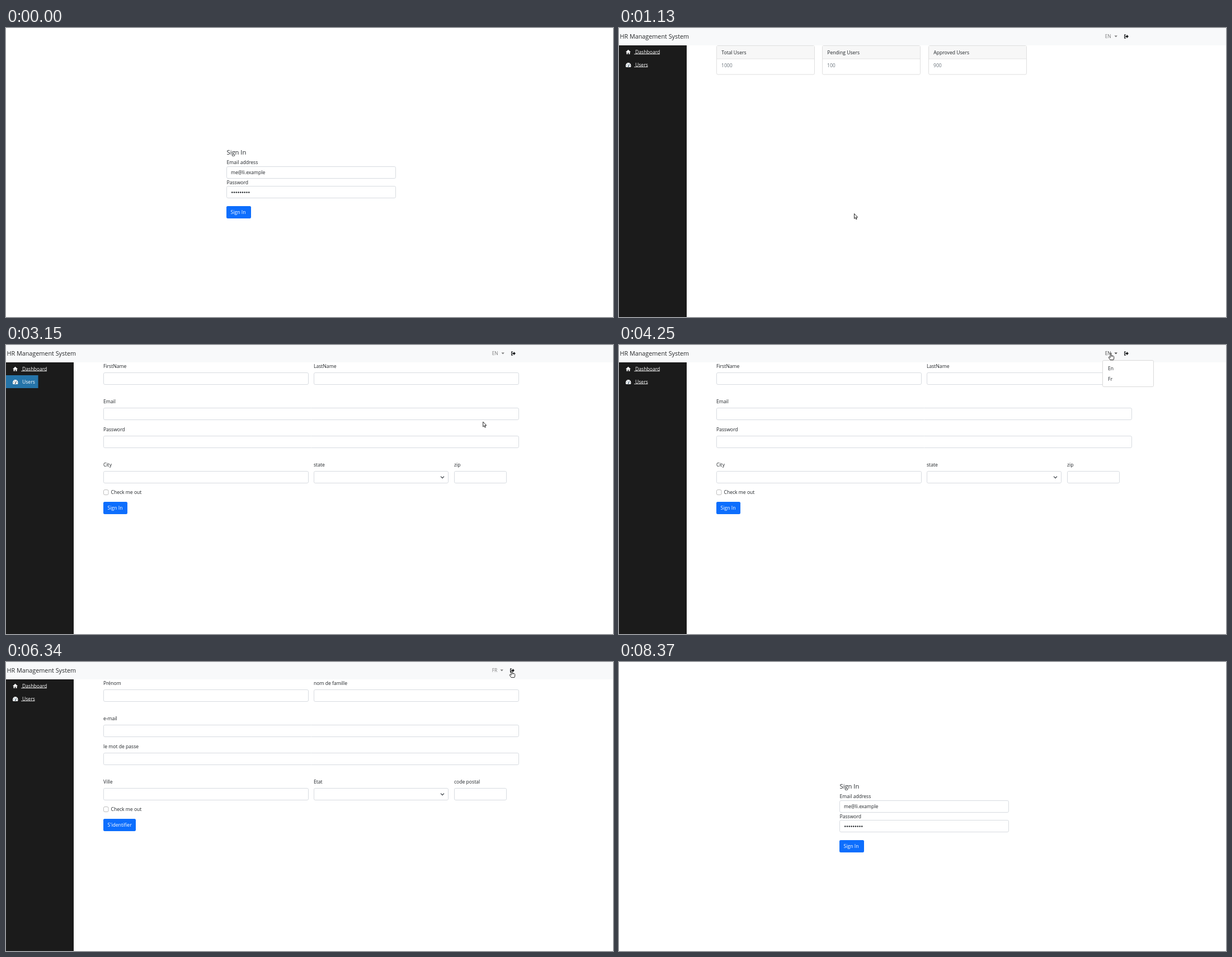
An HTML page with a canvas for the animation above (9.13 s loop, 1085x516 px).

```html
<!DOCTYPE html>
<html lang="en">
<head>
<meta charset="utf-8">
<title>HR admin walkthrough</title>
<style>
  html, body { margin: 0; width: 100%; height: 100%; overflow: hidden; background: #fff; }
  canvas { display: block; }
</style>
</head>
<body>
<canvas id="stage" width="1085" height="516"></canvas>
<script>
const ctx = document.getElementById('stage').getContext('2d');
const LOOP = 9130;
const INK = '#212529', BLUE = '#0d6efd', LINE = '#d7dbe0';

// When the pages and controls change, in ms
const ENTER = 120, DASHBOARD = 1130, HOVER_USERS = 1870, FORM = 2520, LEAVE_USERS = 3230,
      MENU = 4250, FRENCH = 4860, FOCUS_EXIT = 6880, SIGN_OUT = 8370;

// Pointer glides: each eases out towards its stop
const GLIDES = [
  { from: ENTER, to: 280, x: 442, y: 394 },
  { from: 430, to: 890, x: 420, y: 331 },
  { from: 1590, to: 1990, x: 41, y: 61 },
  { from: 2980, to: 3460, x: 953, y: 146 },
  { from: 3460, to: 4080, x: 879, y: 14 },
  { from: 4310, to: 4540, x: 879, y: 59 },
  { from: 6330, to: 6340, x: 904, y: 15 },
  { from: 6730, to: FOCUS_EXIT, x: 906, y: 13 },
  { from: 7970, to: 8130, x: 1085, y: 410 }
];
const CLICKS = [[1040, DASHBOARD], [2370, FORM], [4690, FRENCH], [FOCUS_EXIT, 7350]];

// Twelve-column form grid: every field is [English, French, columns]
const LEFT = 174, COLUMN = 62.7, GUTTER = 9.4;
const ROWS = [
  { top: 49, fields: [['FirstName', 'Prénom', 6], ['LastName', 'nom de famille', 6]] },
  { top: 112, fields: [['Email', 'e-mail', 12]] },
  { top: 162, fields: [['Password', 'le mot de passe', 12]] },
  { top: 225, fields: [['City', 'Ville', 6], ['state', 'Etat', 4], ['zip', 'code postal', 1.65]] }
];

const ARROW = new Path2D('M.5 .5V9.3L2.4 7.5 3.8 10.6 5.2 10 3.8 7H6.6Z');
const HAND = new Path2D('M-1 1C-1-.2 1-.2 1 1V5L4.5 5.6Q5.7 6 5.7 7.5V9Q5.7 11 4.8 12.6H-1L-3.7 8.6Q-3.8 7-2.5 7.2L-1 8.6Z');
const HOUSE = new Path2D('M0 4.3L4.5 0 9 4.3H7.5V8H5.3V5.2H3.7V8H1.5V4.3Z');
const EXIT = new Path2D('M-1.5-1.2H1V-3.3L4.2 0 1 3.3V1.2H-1.5Z');
const CARET = new Path2D('M0 0h5.4l-2.7 2.9Z');

const between = (t, a, b) => t >= a && t < b;
const inside = (p, x, y, w, h) => between(p.x, x, x + w) && between(p.y, y, y + h);
const progress = (t, start, length) => Math.min(1, Math.max(0, (t - start) / length));
const easeOut = (k, power) => 1 - (1 - k) ** power;

function text(str, x, cy, color = INK, size = 8.6, weight = 400) {
  ctx.font = `${weight} ${size}px "Open Sans", "Noto Sans", sans-serif`;
  ctx.fillStyle = color;
  ctx.fillText(str, x, cy + size * 0.36);
}

function rect(x, y, w, h, color) {
  ctx.fillStyle = color;
  ctx.fillRect(x, y, w, h);
}

function box(x, y, w, h, fill, stroke, lineWidth = 1, radius = 2.3) {
  ctx.beginPath();
  ctx.roundRect(x, y, w, h, radius);
  if (fill) { ctx.fillStyle = fill; ctx.fill(); }
  if (stroke) { ctx.strokeStyle = stroke; ctx.lineWidth = lineWidth; ctx.stroke(); }
}

function disc(x, y, r, color) {
  ctx.beginPath();
  ctx.arc(x, y, r, 0, Math.PI * 2);
  ctx.fillStyle = color;
  ctx.fill();
}

function stroke(path, color, width) {
  ctx.strokeStyle = color;
  ctx.lineWidth = width;
  ctx.stroke(new Path2D(path));
}

function at(x, y, paint) {
  ctx.save();
  ctx.translate(x, y);
  paint();
  ctx.restore();
}

function glyph(path, x, y, color) {
  at(x, y, () => {
    ctx.fillStyle = color;
    ctx.fill(path);
  });
}

const field = (x, y, w) => box(x + .5, y + .5, w - 1, 21, '#fff', LINE);

function button(label, x, y, w, color = BLUE) {
  box(x, y, w, 22, color);
  text(label, x + 7.5, y + 11, '#fff', 8.7);
}

function pointerAt(t) {
  let x = 821, y = 474;
  for (const g of GLIDES) {
    const k = easeOut(progress(t, g.from, g.to - g.from), 5);
    x += (g.x - x) * k;
    y += (g.y - y) * k;
  }
  return { x, y };
}

function login(p) {
  const x = 394, hover = inside(p, x, 318, 44, 22);
  text('Sign In', x + .5, 222, INK, 11.2, 500);
  text('Email address', x + .5, 240);
  field(x, 247, 303);
  text('me@li.example', x + 8, 258);
  text('Password', x + .5, 276);
  field(x, 282, 303);
  for (let i = 0; i < 9; i++) disc(x + 10.2 + i * 3.75, 293.6, 1.25, INK);
  button('Sign In', x, 318, 44, hover ? '#0b5ed7' : BLUE);
  return hover ? 'hand' : 'arrow';
}

function navbar(t, lang, overLang) {
  const shift = lang === 'FR' ? -2 : 0;
  const grey = `rgba(0,0,0,${overLang ? .7 : .5})`;
  rect(0, 0, 1085, 31, '#f8f9fa');
  text('HR Management System', 1.5, 15.5, '#26282a', 10.8);
  text(lang, 868.7, 15.3, grey, 8.4);
  glyph(CARET, 885.5 + shift, 13.5, grey);

  const ring = progress(t, FOCUS_EXIT, 300);
  if (ring) box(892.2, 3.2, 26.6, 23.6, null, `rgba(13,110,253,${.25 * ring})`, 2.3);
  at(906.7 + shift, 15.1, () => {
    stroke('M-.8-3H-3V3H-.8', '#16181a', 1.2);
    glyph(EXIT, 0, 0, '#16181a');
  });
}

function sideLink(label, y, width, underlined) {
  text(label, 29, y, '#fff');
  if (underlined) rect(27, y + 3.6, width, .8, '#fff');
}

function sidebar(t) {
  rect(0, 31, 121, 485, '#1b1b1b');
  if (between(t, HOVER_USERS, LEAVE_USERS)) {
    rect(0, 54, 57.5 * easeOut(progress(t, HOVER_USERS, 500), 2), 23, '#2574a9');
  }
  glyph(HOUSE, 12, 38.8, '#fff');
  sideLink('Dashboard', 42.7, 46, true);
  at(16.7, 67, () => {
    const dial = '#1b3a50';
    box(-4.7, -5, 9.4, 8, '#fff', null, 0, [4.7, 4.7, 1.5, 1.5]);
    for (let i = 0; i < 4; i++) disc(-3.1 * Math.cos(i * Math.PI / 3), -3.1 * Math.sin(i * Math.PI / 3), .6, dial);
    stroke('M0 1.3L1.5-2', dial, .8);
    disc(0, 1.3, 1, dial);
  });
  sideLink('Users', 65.7, 24.5, !between(t, HOVER_USERS, 3870));
}

function dashboard() {
  const cards = { 'Total Users': 1000, 'Pending Users': 100, 'Approved Users': 900 };
  Object.entries(cards).forEach(([title, count], i) => {
    const x = LEFT + Math.round(i * 189.4);
    box(x + .5, 31.5, 175, 51.5, '#fff', '#dfdfdf');
    rect(x + 1, 32, 174, 22.5, '#f7f7f7');
    rect(x + 1, 54.5, 174, 1, '#dfdfdf');
    text(title, x + 9.3, 43.5);
    text(String(count), x + 9, 67, '#6c757d');
  });
}

function form(lang, p) {
  const french = lang === 'FR';
  let overField = false;
  for (const { top, fields } of ROWS) {
    let x = LEFT;
    for (const [en, fr, columns] of fields) {
      const left = Math.round(x), width = Math.round(columns * COLUMN - GUTTER);
      text(french ? fr : en, left, top - 11);
      field(left, top, width);
      overField ||= inside(p, left, top, width, 22);
      x += columns * COLUMN;
    }
  }
  stroke('M777 234.6l3 3 3-3', '#343a40', 1.2);
  box(174.5, 258.5, 8.5, 9, '#fff', 'rgba(0,0,0,.25)');
  text('Check me out', 187.5, 263.3);
  button(french ? "S'identifier" : 'Sign In', LEFT, 280, french ? 58 : 43);
  return overField;
}

function menu(t, p) {
  const height = 18.5;
  let over = false;
  box(864.5, 27.5, 91, 47, '#fff', '#d9d9d9');
  ['En', 'Fr'].forEach((name, i) => {
    const y = 33 + i * height;
    const hover = inside(p, 865, y, 90, height);
    const pressed = hover && t >= 4690;
    if (hover) rect(865, y, 90, height, pressed ? BLUE : '#e9ecef');
    text(name, 874, y + 9.2, pressed ? '#fff' : INK);
    over ||= hover;
  });
  return over;
}

function admin(t, p) {
  const lang = t < FRENCH ? 'EN' : 'FR';
  const overLang = inside(p, 865, 7, 28, 17);
  let link = overLang || inside(p, 893, 4, 25, 22) || inside(p, 25, 54, 33, 23);
  let overField = false;
  navbar(t, lang, overLang);
  sidebar(t);
  if (t < FORM) dashboard();
  else overField = form(lang, p);
  if (between(t, MENU, FRENCH)) link = menu(t, p) || link;
  return link ? 'hand' : overField ? 'text' : 'arrow';
}

function pointer(p, kind) {
  at(p.x, p.y, () => {
    if (kind === 'text') return stroke('M-2-6H2M0-6V6M-2 6H2', '#222', .9);
    const shape = kind === 'hand' ? HAND : ARROW;
    ctx.fillStyle = '#fff';
    ctx.strokeStyle = '#111';
    ctx.lineWidth = .9;
    ctx.lineJoin = 'round';
    ctx.fill(shape);
    ctx.stroke(shape);
    if (kind === 'hand') stroke('M1 5v2.2M2.8 5.4v2', '#111', .6);
  });
}

function draw(t) {
  const p = pointerAt(t);
  rect(0, 0, 1085, 516, '#fff');
  const kind = between(t, DASHBOARD, SIGN_OUT) ? admin(t, p) : login(p);
  if (CLICKS.some(([down, up]) => between(t, down, up))) disc(p.x - .2, p.y, 7.3, 'rgba(250,225,0,.5)');
  if (between(t, ENTER, 8130)) pointer(p, kind);
}

function tick() {
  draw(performance.now() % LOOP);
  requestAnimationFrame(tick);
}
tick();
</script>
</body>
</html>
```
